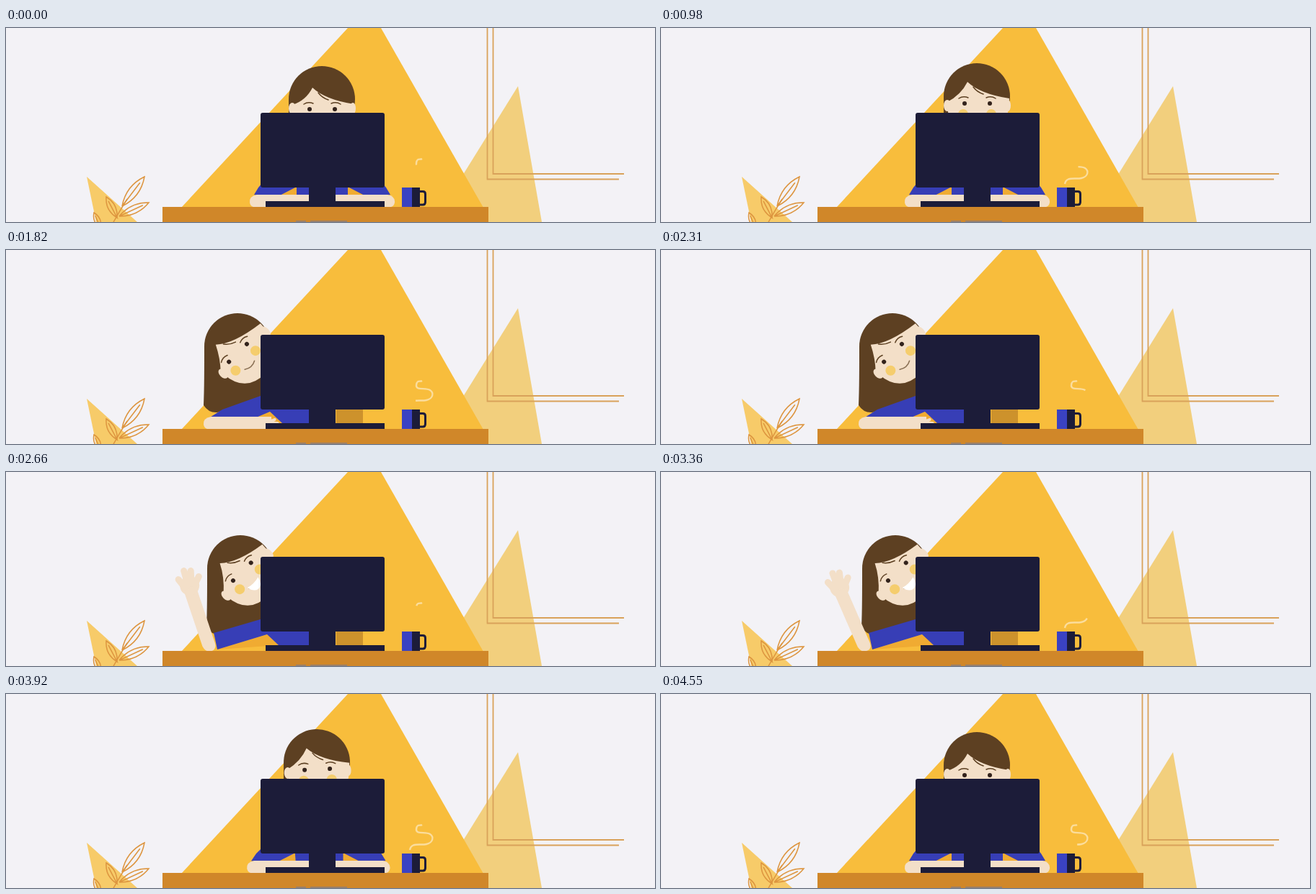
Animation of 900x270 px, one loop 4620 ms. Source, as an HTML page:

```html
<!DOCTYPE html>
<html lang="en">
<head>
<meta charset="utf-8">
<title>Hello from the desk</title>
<style>
  html, body { margin: 0; width: 100%; height: 100%; overflow: hidden; background: #f3f2f6; }
  svg { display: block; width: 100vw; height: 100vh; }
  .line { fill: none; stroke: #d9a25a; stroke-width: 1.8; }
  .leaf { fill: none; stroke: #dd953f; stroke-width: 1.5; }
  .skin { fill: #f3dfc8; }
  .hair { fill: #5d4022; }
  .dark { fill: #1c1c39; }
  .blue { fill: #373eb6; }
  .gold { fill: #f0ab32; }
  .brow { fill: none; stroke: #5d4022; stroke-width: 1.5; stroke-linecap: round; }
</style>
</head>
<body>
<svg viewBox="0 0 900 270">
  <defs>
    <clipPath id="leftSide"><path d="M0 0H440V270H0Z"/></clipPath>
    <clipPath id="rightSide"><path d="M440 0H900V270H440Z"/></clipPath>
    <path id="forearm" d="M0 -9Q-11 -7 -10 2Q-9 9 0 9L84 9V-9Z"/>
  </defs>

  <!-- backdrop -->
  <path fill="#f2cf7d" d="M710 81L593 270H743Z"/>
  <path fill="#f8bd3c" d="M474 0H520L662 250H243Z"/>
  <path fill="#f7cb69" d="M112 207L182 270H125Z"/>
  <path class="line" d="M667.5 0V210.5H850M675.5 0V203H857"/>
  <g id="plant" class="leaf"><path d="M148 272Q158 254 168 238"/></g>

  <!-- person -->
  <path fill="#cd922c" d="M458 222H495V241H458Z"/>
  <g id="backHair" class="hair"><path d="M-46 0C-46 30 -46 60 -47 82Q-40 93 -28 92L32 72V0Z"/></g>
  <g id="head">
    <circle class="hair" r="46"/>
    <path id="skin" class="skin"/>
    <g class="skin"><ellipse cx="-41" cy="13" rx="5" ry="8"/><ellipse cx="43" cy="13" rx="4" ry="8"/></g>
    <g id="face">
      <path class="brow" d="M-25 3Q-19 -1 -12 2M13 2Q20 -1 26 3M-5 -13Q0 -6 9 -3"/>
      <g fill="#33231c"><circle cx="-17" cy="10" r="3"/><circle cx="18" cy="10" r="3"/></g>
      <g fill="#f5cd6d"><circle cx="-19" cy="25" r="7"/><circle cx="20" cy="25" r="7"/></g>
      <path class="brow" stroke-opacity=".7" d="M-9 33Q0 39 9 34"/>
      <path id="smile" fill="#fff" d="M-10 31Q0 34 11 31Q8 43 0 43Q-8 42 -10 31Z"/>
    </g>
  </g>
  <g clip-path="url(#rightSide)">
    <g id="rightArm">
      <polygon class="gold" points="403,235 403,221 376,235"/>
      <polygon class="blue" points="344,232 350,222 360,210 420,215 420,235 403,235 403,221 376,235"/>
      <use href="#forearm" class="skin" x="348" y="241"/>
    </g>
  </g>
  <g clip-path="url(#leftSide)">
    <polygon id="shirt" class="gold"/>
    <polygon id="sleeve" class="blue"/>
    <g id="arm">
      <use href="#forearm" class="skin"/>
      <g id="hand" fill="none" stroke="#f3dfc8" stroke-width="9" stroke-linecap="round">
        <circle class="skin" cx="86" cy="1" r="9"/>
        <path d="M85 -6L99 -11M88 -1L108 0M88 4L105 9M85 8L94 17"/>
      </g>
    </g>
  </g>

  <!-- desk -->
  <path fill="#d08729" d="M217 249H669V270H217Z"/>
  <path fill="#9b8068" d="M402 268H416V270H402ZM422 268H473V270H422Z"/>
  <g class="dark">
    <rect x="353" y="118" width="172" height="104" rx="3"/>
    <path d="M420 220H457V241H525V249H360V241H420Z"/>
    <path d="M562 222H574V249H562Z"/>
  </g>
  <path fill="#3a42c2" d="M549 222H563V249H549Z"/>
  <path fill="none" stroke="#1c1c39" stroke-width="3" d="M573 227.5H578Q581.5 227.5 581.5 231V242Q581.5 246 578 246H573"/>
  <path id="steam" pathLength="1" fill="none" stroke="#fbdd9c" stroke-width="2.4"
    d="M560 217C562 206 574 211 583 209S594 199 588 195S568 196 569 188S574 184 577 182"/>
</svg>
<script>
const LOOP = 4620, STEP = 70;
const $ = id => document.getElementById(id);
const set = (id, name, value) => $(id).setAttribute(name, value);
const clamp = v => Math.min(1, Math.max(0, v));
const mix = (a, b, k) => a + (b - a) * k;
const ramp = (t, from, to) => {
  const u = clamp((t - from) / (to - from));
  return u * u * (3 - 2 * u);
};

// Sleeve outlines: typing, leaning out, waving
const TYPING = [344,232, 350,222, 360,210, 420,215, 420,235, 403,235, 403,221, 376,235];
const LEANING = [278,236, 300,222, 353,203, 420,215, 420,241, 383,241, 366,225, 340,236];
const WAVING = [289,228, 288,224, 353,205, 420,215, 420,241, 378,241, 362,226, 293,247];

function leaf(x, y, tipX, tipY, width) {
  const dx = tipX - x, dy = tipY - y, len = Math.hypot(dx, dy);
  const nx = -dy / len * width, ny = dx / len * width;
  const mx = x + dx * .5, my = y + dy * .5;
  return `<path d="M${x} ${y}Q${mx + nx} ${my + ny} ${tipX} ${tipY}Q${mx - nx} ${my - ny} ${x} ${y}L${x + dx * .8} ${y + dy * .8}"/>`;
}
$('plant').innerHTML += leaf(161, 248, 192, 207, 13) + leaf(157, 262, 198, 243, 11) +
  leaf(154, 264, 139, 235, 10) + leaf(131, 278, 122, 257, 8);

function draw(t) {
  const lean = ramp(t, 1350, 1780) - ramp(t, 3460, 4000);
  const raise = ramp(t, 2310, 2600) - ramp(t, 3430, 3650);
  const peek = ramp(t, 600, 900) - ramp(t, 4150, 4500);

  const x = mix(438, 321, lean) + 4 * raise;
  const y = mix(mix(99, 95, peek), 134, lean ** 3);
  const fx = -6.7 * lean + 4.5 * raise;
  const fy = 4 * (1 - peek) - 3 * lean - 2 * raise;
  set('backHair', 'transform', `translate(${x} ${y})`);
  set('head', 'transform', `translate(${x} ${y}) rotate(${-45 * lean})`);
  set('face', 'transform', `translate(${fx} ${fy})`);
  set('skin', 'd', `M-41 8Q${fx - 22} ${fy - 2} ${fx - 13} ${fy - 20}` +
    `Q${fx + 5} ${fy - 3} 45 ${fy + 3}L44 14Q42 54 0 54Q-38 54 -41 14Z`);
  set('smile', 'opacity', raise);

  const pts = TYPING.map((v, i) => mix(mix(v, LEANING[i], lean), WAVING[i], raise));
  set('sleeve', 'points', pts.join(' '));
  set('shirt', 'points', pts.slice(10).join(' '));

  const wave = 2.5 * Math.cos((t - 2660) / 467 * 2 * Math.PI);
  const elbow = mix(348, 284, lean) - 3 * raise;
  set('arm', 'transform', `translate(${elbow} ${241 - raise}) rotate(${raise * (wave - 111)})`);
  set('hand', 'transform', `translate(80 0) scale(${mix(.45, 1, raise)}) translate(-80 0)`);
  set('rightArm', 'transform', `translate(${877 - 110 * lean} 0) scale(-1 1)`);

  const age = (t + 2250) % 2600;
  const front = clamp(age / 900), tail = clamp((age - 1300) / 1150);
  set('steam', 'stroke-dasharray', `${front - tail} 3`);
  set('steam', 'stroke-dashoffset', -tail);
  set('steam', 'opacity', front > tail ? 1 : 0);
}

const start = performance.now();
function tick() {
  const t = (performance.now() - start) % LOOP;
  draw(Math.floor(t / STEP) * STEP);
  requestAnimationFrame(tick);
}
tick();
</script>
</body>
</html>
```
